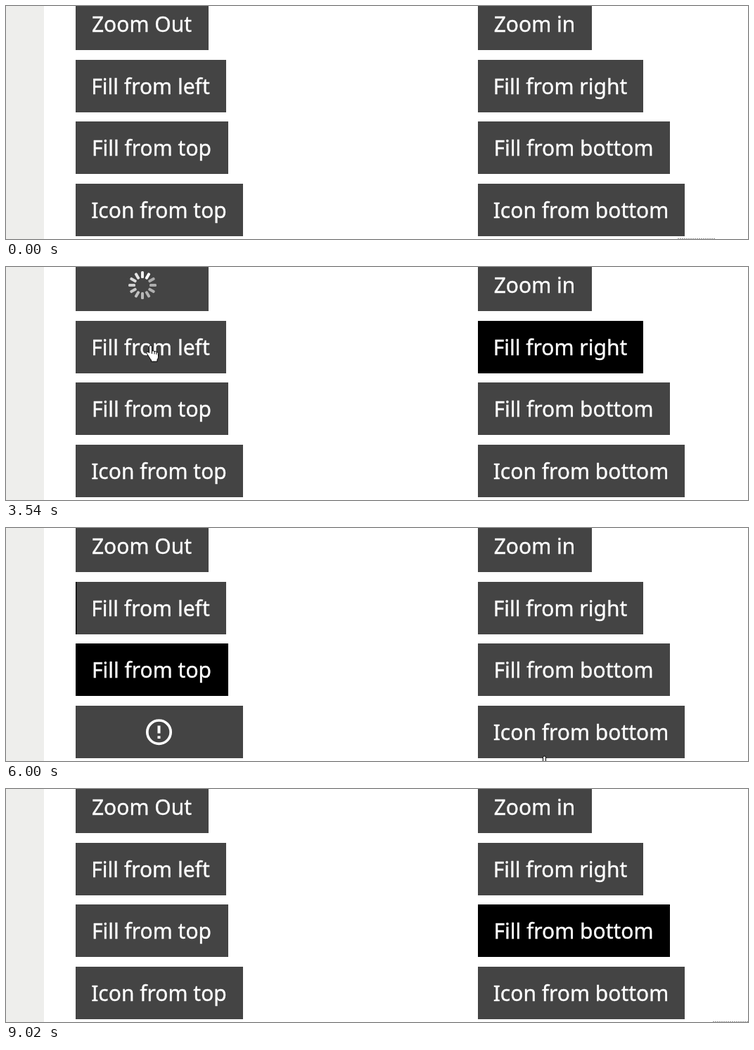
Recreate the animation shown at these times as an HTML page. Size 1055 px wide and 333 px high, loop 9.09 s.

```html
<!DOCTYPE html>
<html lang="en">
<head>
<meta charset="utf-8">
<title>Button hover effects</title>
<style>
html, body { margin: 0; width: 100%; height: 100%; overflow: hidden; background: #fff; }
svg { display: block; }
text { font: 30px "Noto Sans", "Open Sans", sans-serif; fill: #fff; stroke: #fff; stroke-width: .35px; text-anchor: middle; }
</style>
</head>
<body>
<svg width="1055" height="333" viewBox="0 0 1055 333">
  <rect width="54" height="333" fill="#eeeeec"/>
  <g id="buttons"></g>
  <path id="edge" stroke="#999" stroke-dasharray="2 1"/>
  <g id="pointer" stroke="#000" stroke-linejoin="round">
    <path id="arrow" fill="#fff" d="M.5 .5V16.5L4.2 13L6.8 18.8L9.2 17.8L6.7 12H11.5Z"/>
    <g id="hand" fill="#fff">
      <path d="M-1.5 1q0-2 2-2q2 0 2 2v6q2.5-1 3.5 .8q2.3-.8 3 .8q2.5-.5 2.5 2v5q0 2-1.5 4v2.5h-8.5v-2q-1.5-1.5-3-4.5l-3-4.5q-1.5-2 .3-2.8q1.5-.4 2.7 1.5z"/>
      <path d="M2.5 7v4M6 8v3.5M9 9v3"/>
    </g>
  </g>
</svg>
<script>
const LOOP = 9090, START = 200, END = 9000, STEP = 77.3, HEIGHT = 75;
const byId = id => document.getElementById(id);

function set(node, attrs) {
  for (const key in attrs) node.setAttribute(key, attrs[key]);
}
function add(parent, tag, attrs = {}) {
  const node = document.createElementNS("http://www.w3.org/2000/svg", tag);
  set(node, attrs);
  parent.append(node);
  return node;
}

// CSS "ease": cubic-bezier(.25, .1, .25, 1)
function ease(x) {
  if (x <= 0) return 0;
  if (x >= 1) return 1;
  const bezier = (s, a, b) => 3 * (1 - s) ** 2 * s * a + 3 * (1 - s) * s * s * b + s ** 3;
  let low = 0, high = 1;
  for (let i = 0; i < 20; i++) {
    const mid = (low + high) / 2;
    if (bezier(mid, .25, .25) < x) low = mid; else high = mid;
  }
  return bezier(low, .1, 1);
}

// Two columns, row by row; each effect runs in at "on" and back out at "off".
const buttons = [
  { label: "Zoom Out", w: 189, effect: "zoom", side: 1, on: 2900, off: 4800 },
  { label: "Zoom in", w: 162, effect: "zoom", side: -1, on: 1040, off: 2700 },
  { label: "Fill from left", w: 214, effect: "left", on: 3550, off: 5325 },
  { label: "Fill from right", w: 235, effect: "right", on: 1533, off: 3545 },
  { label: "Fill from top", w: 217, effect: "top", on: 4095, off: 6300 },
  { label: "Fill from bottom", w: 273, effect: "bottom", on: 6640, off: Infinity },
  { label: "Icon from top", w: 238, effect: "icon", side: -1, on: 4450, off: 6350 },
  { label: "Icon from bottom", w: 294, effect: "icon", side: 1, on: 6150, off: 8390 }
];

function build(b, index) {
  b.x = 99 + 572 * (index % 2);
  b.y = Math.round(88.4 * Math.floor(index / 2) - 11.6);
  const box = add(byId("buttons"), "svg", { x: b.x, y: b.y, width: b.w, height: HEIGHT, overflow: "hidden" });
  add(box, "rect", { width: b.w, height: HEIGHT, fill: "#444" });
  b.fill = add(box, "rect", { width: 0, height: HEIGHT });
  b.text = add(box, "text", { x: b.w / 2 - .5, y: 49 });
  b.text.textContent = b.label;
  b.icon = add(box, "g");
  if (b.effect === "zoom") {
    b.bars = Array.from({ length: 12 }, (_, i) => add(b.icon, "rect",
      { x: -2, y: -20, width: 4, height: 10, rx: 1.5, fill: "#fff", transform: `rotate(${i * 30})` }));
  } else if (b.effect === "icon") {
    add(b.icon, "circle", { r: 16.7, fill: "none", stroke: "#fff", "stroke-width": 3.7 });
    add(b.icon, "path", { d: "M-2-9.2h4v11h-4zM-2 5.5h4v3.7h-4z", fill: "#fff" });
  }
}

const effects = {
  left: (b, p) => set(b.fill, { width: b.w * p }),
  right: (b, p) => set(b.fill, { x: b.w * (1 - p), width: b.w * p }),
  top: (b, p) => set(b.fill, { width: b.w, height: HEIGHT * p }),
  bottom: (b, p) => set(b.fill, { width: b.w, y: HEIGHT * (1 - p), height: HEIGHT * p }),
  icon(b, p) {
    set(b.text, { transform: `translate(0 ${-b.side * HEIGHT * p})` });
    set(b.icon, { transform: `translate(${b.w / 2 - .5} ${37.7 + b.side * HEIGHT * (1 - p)})` });
  },
  zoom(b, p, t) {
    const cx = b.w / 2, cy = 38;
    set(b.text, { opacity: 1 - p, transform: `translate(${cx} ${cy}) scale(${1 + b.side * p}) translate(${-cx} ${-cy})` });
    set(b.icon, { opacity: p, transform: `translate(${cx + .5} ${cy}) scale(${1 + b.side * (1 - p)})` });
    const turn = (t - b.on) / 1000 + .45;
    b.bars.forEach((bar, i) => {
      const age = (Math.round(turn * 12) - i + 120) % 12;
      set(bar, { opacity: .55 + .45 * (1 - age / 12) ** 2 });
    });
  }
};

// Pointer way: time, x, y
const way = [
  [START, 988, 318], [520, 985, 120], [900, 767, 15], [1500, 758, 110], [2055, 597, 90],
  [2800, 203, 34], [3520, 205, 112], [4300, 228, 237], [5300, 420, 328], [5997, 765, 327],
  [7470, 817, 212], [8310, 817, 212], [END, 1050, 333]
];

function pointerAt(t) {
  const i = Math.max(1, way.findIndex(stop => stop[0] > t));
  const [t0, x0, y0] = way[i - 1], [t1, x1, y1] = way[i];
  const k = (t - t0) / (t1 - t0);
  return [Math.round(x0 + (x1 - x0) * k), Math.round(y0 + (y1 - y0) * k)];
}

function drawPointer(t) {
  const shown = t >= START && t < END;
  set(byId("pointer"), { visibility: shown ? "visible" : "hidden" });
  if (!shown) return;
  const [x, y] = pointerAt(t), [nextX, nextY] = pointerAt(Math.min(t + STEP, END - 1));
  const moving = x !== nextX || y !== nextY;
  const over = buttons.some(b => nextX >= b.x && nextX < b.x + b.w && nextY >= b.y && nextY < b.y + HEIGHT);
  set(byId("pointer"), { transform: `translate(${x} ${y})` });
  set(byId("hand"), { display: moving && over ? "inline" : "none" });
  set(byId("arrow"), { display: moving && over ? "none" : "inline" });
}

function draw(now) {
  const time = now % LOOP;
  const t = time < START ? 0 : START + Math.floor((time - START) / STEP) * STEP;
  for (const b of buttons) {
    const span = b.side ? 520 : 750;
    effects[b.effect](b, ease((t - b.on) / span) - ease((t - b.off) / span), t);
  }
  set(byId("edge"), { d: t < START ? "M955 332.5H1008" : t >= END ? "M1005 332.5H1055" : "" });
  drawPointer(t);
}

function tick() {
  draw(performance.now());
  requestAnimationFrame(tick);
}

buttons.forEach(build);
tick();
</script>
</body>
</html>
```
